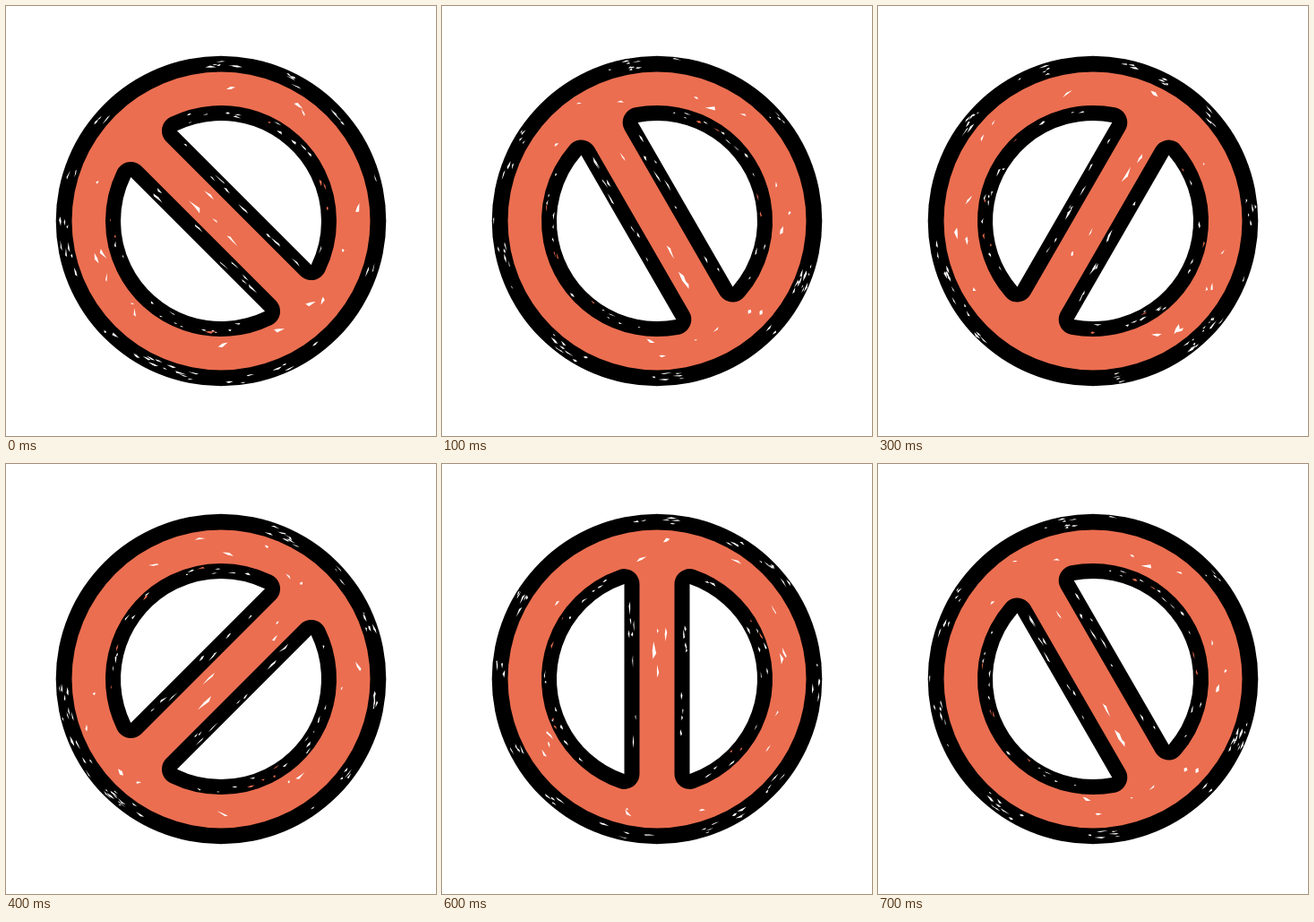
Recreate the animation shown at these times as an HTML page with a canvas. Size 480 px wide and 480 px high, loop 0.8 s.

```html
<!DOCTYPE html>
<html lang="en">
<head>
<meta charset="utf-8">
<title>Rocking prohibition sign</title>
<style>
html, body { margin: 0; height: 100%; overflow: hidden; background: #fff; }
canvas { display: block; }
</style>
</head>
<body>
<canvas width="480" height="480"></canvas>
<script>
const ctx = document.querySelector('canvas').getContext('2d');
const RED = '#eb6e50', DEG = Math.PI / 180;
const SWING = [-45, -30, 0, 30, 45];
const HOLE = 112, CUT = 36.5, LINE = 17, HALF = Math.acos(CUT / HOLE);

function seeded(seed) {
  return (a, b) => {
    seed = (seed * 16807) % 2147483647;
    return a + (b - a) * seed / 2147483647;
  };
}

function turned(angle, paint) {
  ctx.save();
  ctx.rotate(angle * DEG);
  paint();
  ctx.restore();
}

function disc(r, color) {
  ctx.fillStyle = color;
  ctx.beginPath();
  ctx.arc(0, 0, r, 0, 360 * DEG);
  ctx.fill();
}

// A tapered sliver where the paint missed, lying along y
function sliver(rnd, x, y, length, width, color = '#fff') {
  ctx.fillStyle = color;
  ctx.beginPath();
  ctx.moveTo(x, y - length / 2);
  ctx.lineTo(x + width, y + length * rnd(-0.3, 0.4));
  ctx.lineTo(x + width * rnd(-0.5, 0.5), y + length / 2);
  ctx.lineTo(x - width * rnd(0, 0.6), y);
  ctx.fill();
}

// Parallel slivers that follow the rim
function rimMarks(rnd) {
  for (let i = 0; i < 22; i++) {
    turned(rnd(0, 360), () => {
      for (let n = rnd(0, 4); n > 0; n--) {
        sliver(rnd, rnd(170, 182), rnd(-9, 9), rnd(3, 13), rnd(0.7, 1.8));
      }
    });
  }
}

function paintMarks(rnd) {
  for (let i = 0; i < 15; i++) {
    turned(rnd(0, 360), () => {
      ctx.translate(rnd(134, 160), 0);
      turned(rnd(-35, 35), () => sliver(rnd, 0, 0, rnd(3, 14), rnd(1, 3)));
    });
  }
}

function barMarks(rnd) {
  for (let i = 0; i < 4; i++) {
    sliver(rnd, rnd(-12, 12), rnd(-110, 110), rnd(5, 22), rnd(1, 3));
  }
}

function hole(rnd) {
  ctx.beginPath();
  ctx.arc(0, 0, HOLE, -HALF, HALF);
  ctx.closePath();
  ctx.lineWidth = 2 * LINE;
  ctx.lineJoin = 'round';
  ctx.strokeStyle = '#000';
  ctx.stroke();
  ctx.fillStyle = '#fff';
  ctx.fill();
  for (let i = 0; i < 16; i++) {
    const color = i % 4 ? '#fff' : RED;
    turned(rnd(-65, 65), () =>
      sliver(rnd, rnd(115, 126), 0, rnd(3, 10), rnd(0.7, 1.8), color));
    if (i % 2) {
      sliver(rnd, rnd(23, 33), rnd(-95, 95), rnd(4, 16), rnd(0.7, 1.8), color);
    }
  }
}

function draw(pose) {
  const rnd = seeded(7919 * (pose + 3));
  ctx.setTransform(1, 0, 0, 1, 0, 0);
  ctx.fillStyle = '#fff';
  ctx.fillRect(0, 0, 480, 480);
  ctx.translate(240, 240);
  disc(184.3, '#000');
  disc(166.5, RED);
  rimMarks(rnd);
  turned(SWING[pose], () => {
    hole(rnd);
    turned(180, () => hole(rnd));
    barMarks(rnd);
  });
  paintMarks(rnd);
}

let shown = -1;
function tick(now) {
  const step = Math.floor(now / 100) % 8;
  const pose = Math.min(step, 8 - step);
  if (pose !== shown) draw(shown = pose);
  requestAnimationFrame(tick);
}
tick(performance.now());
</script>
</body>
</html>
```
